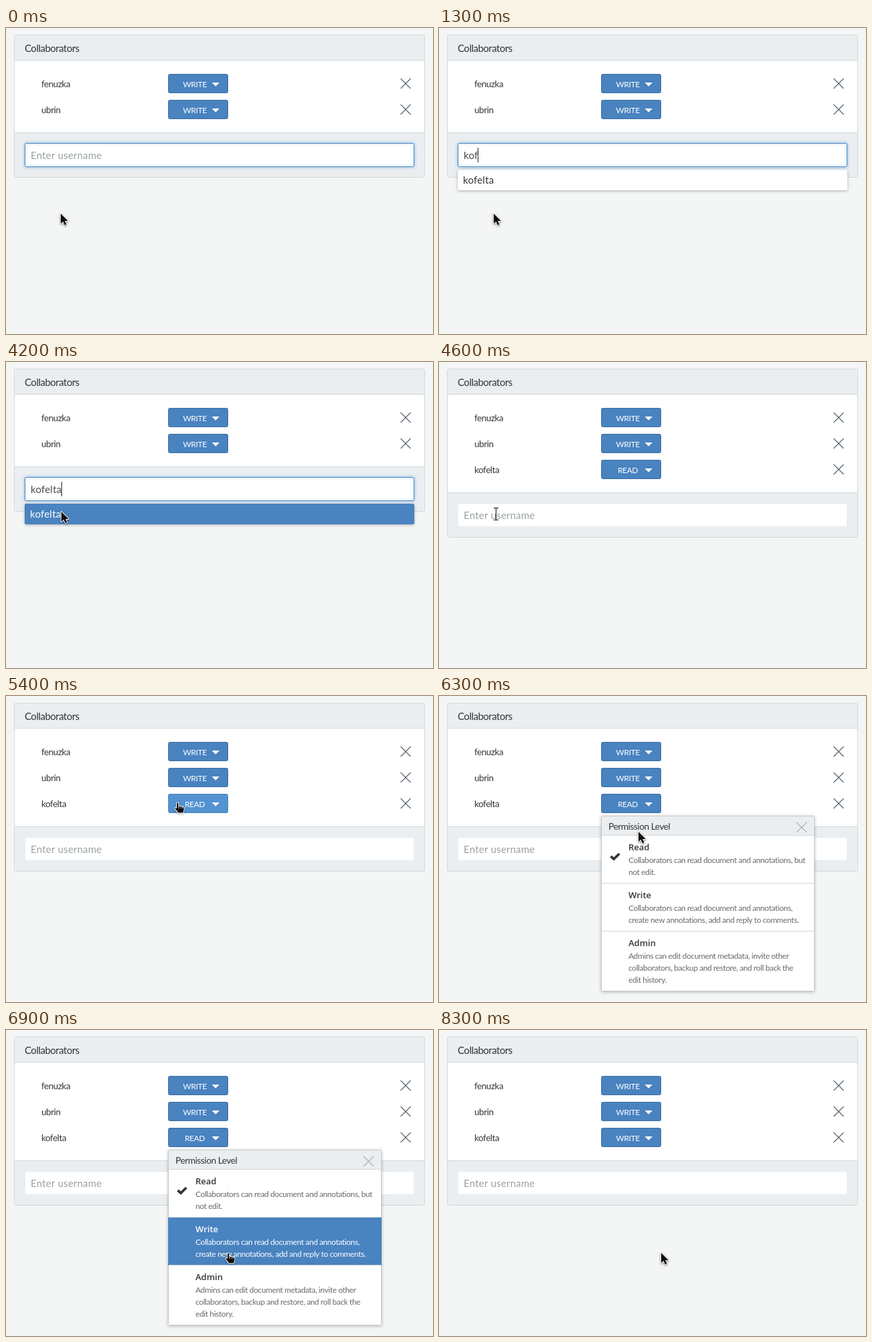
Write an HTML page with a canvas that moves like this. It is 640 px wide and 460 px high and loops after 9.1 s.

```html
<!DOCTYPE html>
<html lang="en">
<head>
<meta charset="utf-8">
<title>Collaborators</title>
<style>
html, body { margin: 0; width: 100%; height: 100%; overflow: hidden; background: #f4f6f6; }
canvas { display: block; }
</style>
</head>
<body>
<canvas id="stage" width="640" height="460"></canvas>
<script>
const ctx = document.getElementById('stage').getContext('2d');
const LOOP = 9100, STEP = 100;
const BLUE = '#4983c0', HOVER = '#5393d1', PALE = '#eaeef1', LINE = '#d2d7da', INK = '#333638';
const TIGHT = -.033, LOOSE = .015; // letter spacing in em
const NAME = 'kofelta';
const KEYS = [700, 1100, 1300, 1900, 2100, 2300, 3000];
const ADDED = 4600, OPENED = 5900, CHOSEN = 8100;

// time, x, y of the pointer
const PATH = [
  [0, 82, 279], [3700, 82, 279], [3800, 90, 248], [3900, 82, 228], [4100, 83, 227], [4200, 83, 225],
  [4800, 83, 225], [4900, 122, 209], [5100, 258, 170], [5200, 287, 166], [5300, 287, 166],
  [5400, 257, 160], [6100, 257, 160], [6200, 278, 184], [6300, 299, 204], [6500, 319, 262],
  [6700, 331, 314], [6900, 333, 335]
];
const LEVELS = [
  { title: 'Read', top: 210, height: 72, lines: ['Collaborators can read document and annotations, but', 'not edit.'] },
  { title: 'Write', top: 282, height: 72, lines: ['Collaborators can read document and annotations,', 'create new annotations, add and reply to comments.'] },
  { title: 'Admin', top: 354, height: 89, lines: ['Admins can edit document metadata, invite other', 'collaborators, backup and restore, and roll back the', 'edit history.'] }
];

function pointerAt(t) {
  const i = PATH.findIndex(p => p[0] > t);
  if (i < 0) return PATH[PATH.length - 1].slice(1);
  const [t0, x0, y0] = PATH[i - 1], [t1, x1, y1] = PATH[i];
  const k = (t - t0) / (t1 - t0);
  return [x0 + (x1 - x0) * k, y0 + (y1 - y0) * k];
}

function box(x, y, w, h, fill, stroke, radius = 0) {
  ctx.beginPath();
  ctx.roundRect(x, y, w, h, radius);
  if (fill) { ctx.fillStyle = fill; ctx.fill(); }
  if (stroke) { ctx.strokeStyle = stroke; ctx.lineWidth = 1; ctx.stroke(); }
}

function shadowed(color, blur, dy, draw) {
  ctx.save();
  ctx.shadowColor = color;
  ctx.shadowBlur = blur;
  ctx.shadowOffsetY = dy;
  draw();
  ctx.restore();
}

function text(str, x, y, size, color = INK, { spacing = TIGHT, align = 'left' } = {}) {
  ctx.save();
  ctx.font = `${size}px Lato, sans-serif`;
  ctx.letterSpacing = spacing * size + 'px';
  ctx.textAlign = align;
  ctx.fillStyle = color;
  ctx.fillText(str, x, y);
  const width = ctx.measureText(str).width;
  ctx.restore();
  return width;
}

function shape(points, fill, stroke, width = 1) {
  ctx.beginPath();
  points.forEach(([x, y]) => ctx.lineTo(x, y));
  ctx.lineWidth = width;
  if (fill) { ctx.closePath(); ctx.fillStyle = fill; ctx.fill(); }
  if (stroke) { ctx.strokeStyle = stroke; ctx.stroke(); }
}

function cross(x, y, color) {
  shape([[x - 7.5, y - 7.5], [x + 7.5, y + 7.5]], null, color, 1.1);
  shape([[x + 7.5, y - 7.5], [x - 7.5, y + 7.5]], null, color, 1.1);
}

function row(i, name, label, hot) {
  const y = 69 + 39 * i;
  text(name, 53, y + 20, 13.5);
  box(243.5, y + .5, 89, 28, hot ? HOVER : BLUE, hot ? '#4a86c0' : '#3a6ca3', 2);
  text(label, 283, y + 20, 12, '#fff', { align: 'center' });
  shape([[308.5, y + 13], [320, y + 13], [314.2, y + 18.7]], '#fff');
  cross(599, y + 14.5, '#53606c');
}

function field(y, typed, focused, caret) {
  if (focused) {
    shadowed('rgba(74,144,217,.6)', 4, 0, () => box(28.5, y + .5, 583, 35, '#fff', '#4d8cc4', 2));
  } else {
    box(28.5, y + .5, 583, 35, '#fff', '#e8edf0', 1);
  }
  const width = text(typed || 'Enter username', 37, y + 24, 15, typed ? '#454a4d' : '#9aa1a5', { spacing: LOOSE });
  if (caret) {
    ctx.fillStyle = '#222';
    ctx.fillRect(Math.round(typed ? 37 + width : 36), y + 7, 1, 22);
  }
}

function suggestion(active) {
  shadowed('rgba(0,0,0,.3)', 4, 1, () => box(28, 213, 584, 31, active ? BLUE : '#fff', null, 2));
  text(NAME, 36, 234, 15, active ? '#fff' : INK, { spacing: LOOSE });
}

function popup(hovered) {
  shadowed('rgba(0,0,0,.28)', 5, 1, () => box(243, 180, 320, 264, '#fff', null, 1));
  box(243.5, 180.5, 319, 263, '#fff', '#c8cdd0', 1);
  box(244, 181, 318, 28, PALE);
  text('Permission Level', 254, 201, 13.7);
  cross(543.5, 197.5, '#a7b0b7');
  LEVELS.forEach((level, i) => {
    const { title, top, height, lines } = level, hot = level === hovered;
    box(244, top - 1, 318, 1, LINE);
    if (hot) box(243, top, 320, height, BLUE);
    ctx.font = '600 13px "Open Sans", sans-serif';
    ctx.fillStyle = hot ? '#fff' : INK;
    ctx.fillText(title, 284, top + 22);
    lines.forEach((line, n) => text(line, 284, top + 41 + 18 * n, 12, hot ? '#fff' : '#666b6e'));
    if (!i) shape([[257.5, 241], [262, 245.2], [270.3, 237]], null, hot ? '#fff' : INK, 3.8);
  });
}

function arrow(x, y) {
  const points = [[0, 0], [0, 15], [3.5, 12], [6, 17.5], [8.6, 16.3], [6.2, 11], [11, 11]];
  ctx.save();
  ctx.translate(x, y);
  ctx.lineJoin = 'round';
  shadowed('rgba(0,0,0,.4)', 3, 1, () => shape(points, '#fff', '#fff', 1.8));
  shape(points, '#111');
  ctx.restore();
}

function hand(x, y) {
  const outline = new Path2D('M-1 1Q0-.5 1.3 1V6Q3 4.8 4 6.3Q6 5.3 7 6.9Q9.3 6.2 9.5 8.5V11Q9.5 13 8 15.5H1Q-.5 12.5-3 10L-3.6 8.6Q-3.4 7.6-2.3 8L-1 9Z');
  ctx.save();
  ctx.translate(x, y);
  ctx.lineJoin = 'round';
  ctx.lineWidth = 2;
  ctx.strokeStyle = '#fff';
  shadowed('rgba(0,0,0,.4)', 3, 1, () => ctx.stroke(outline));
  ctx.fillStyle = '#111';
  ctx.fill(outline);
  ctx.lineWidth = .7;
  ctx.stroke(new Path2D('M1.5 6V9M4.2 6.5V9M7 7V9'));
  ctx.restore();
}

function beam(x, y) {
  ctx.fillStyle = '#111';
  ctx.fillRect(x, y - 8, 1, 17);
  ctx.fillRect(x - 3, y - 9, 7, 1);
  ctx.fillRect(x - 3, y + 9, 7, 1);
}

function draw(t) {
  const [x, y] = pointerAt(t);
  const added = t >= ADDED, open = t >= OPENED && t < CHOSEN;
  const footer = added ? 196 : 157;
  const pressed = KEYS.filter(k => t >= k);
  const typed = added ? '' : NAME.slice(0, pressed.length);
  const caret = !added && t >= 200 && (t - Math.max(200, ...pressed)) % 1200 < 600;
  const onButton = added && x > 243 && x < 333 && y > 147 && y < 177;
  const hovered = open && LEVELS.find(l => y >= l.top && y < l.top + l.height);

  ctx.fillStyle = '#f4f6f6';
  ctx.fillRect(0, 0, 640, 460);
  box(12.5, 10.5, 615, footer + 57, '#fff', LINE, 2);
  box(13, 11, 614, 37, PALE);
  box(13, 48, 614, 1, LINE);
  box(13, footer, 614, 67, PALE);
  box(13, footer, 614, 1, LINE);
  text('Collaborators', 28, 36, 15);
  row(0, 'fenuzka', 'WRITE');
  row(1, 'ubrin', 'WRITE');
  if (added) row(2, NAME, t < CHOSEN ? 'READ' : 'WRITE', onButton);
  field(footer + 16, typed, !added, caret);
  if (t >= KEYS[2] && !added) suggestion(t >= KEYS[6]);
  if (open) popup(hovered);

  if (onButton || hovered) hand(x, y);
  else if (added && t < 4900) beam(85, 228);
  else arrow(x, y);
}

const start = performance.now();
function tick() {
  const t = (performance.now() - start) % LOOP;
  draw(Math.floor(t / STEP) * STEP);
  requestAnimationFrame(tick);
}
tick();
</script>
</body>
</html>
```
